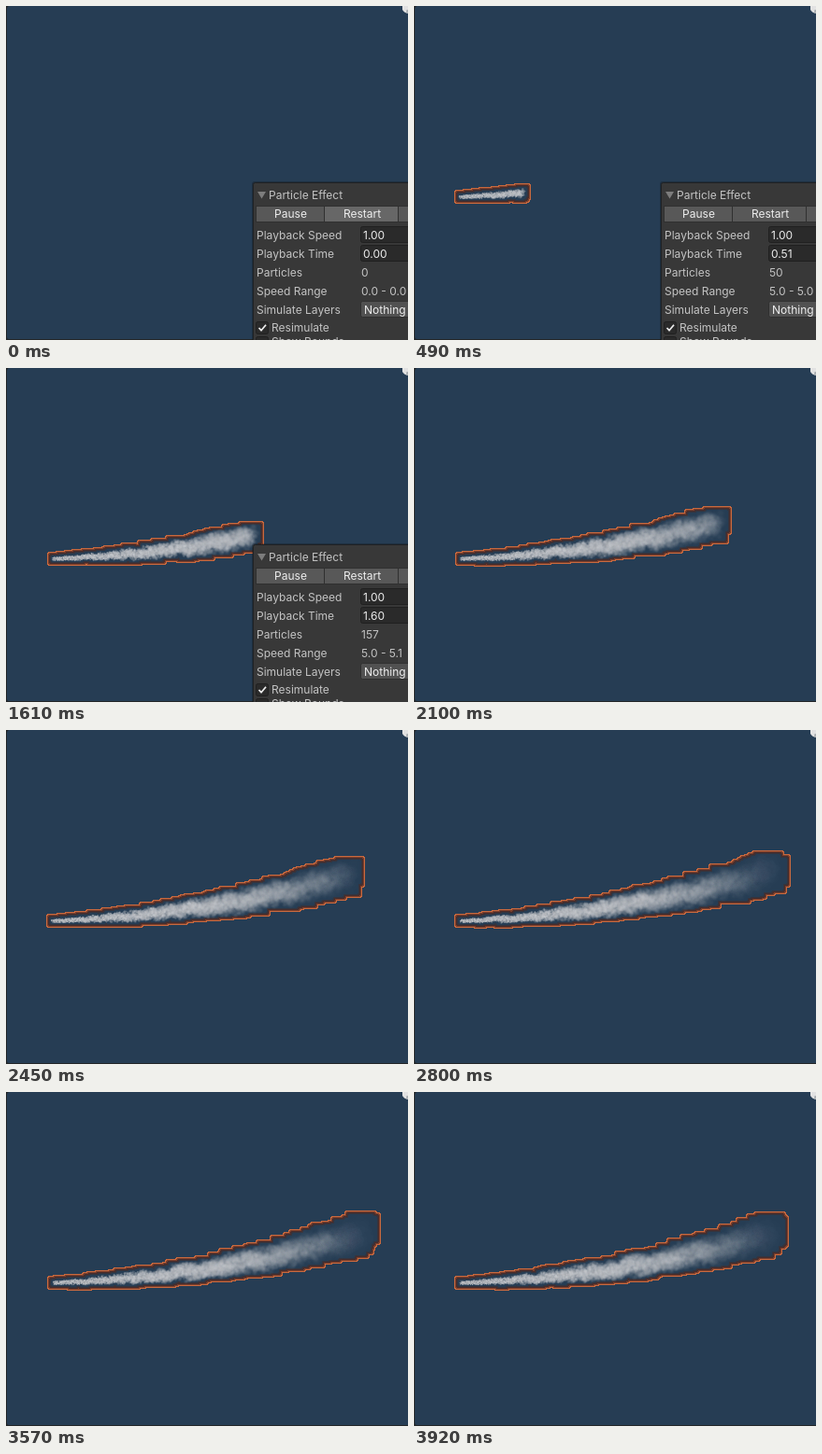
Animation, 430 px wide and 358 px high, one loop 3990 ms. Source, as an HTML page with a canvas:

```html
<!DOCTYPE html>
<html lang="en">
<head>
<meta charset="utf-8">
<title>Smoke trail</title>
<style>
  html, body { margin: 0; width: 100%; height: 100%; overflow: hidden; background: #263d54; }
  canvas, svg { position: absolute; left: 0; top: 0; width: 430px; height: 358px; display: block; }
  text { font: 12px Inter, sans-serif; fill: #c4c4c4; white-space: pre; }
  .bright { fill: #eee; }
  .mid { text-anchor: middle; }
  .field { fill: #2a2a2a; stroke: #202020; }
  .btn { fill: #585858; stroke: #303030; }
</style>
</head>
<body>
<canvas id="stage" width="430" height="358"></canvas>
<svg viewBox="0 0 430 358">
  <path d="M424 0H430V8Q426 7.500 424 4Z" fill="#e2e2e2"/>
  <path d="M428.500 4H430V8L428 7Z" fill="#a9adb0"/>
  <path d="M0 0H3Q1 1 1 3V355Q1 357 3 357H430V358H0Z" fill="#232628"/>
  <g id="panel">
    <rect x="263" y="188" width="170" height="173" rx="3" fill="#000" opacity=".25"/>
    <rect x="264.500" y="189.500" width="170" height="173" rx="2" fill="#383838" stroke="#202224"/>
    <path d="M269 199H278L273.500 206.500Z" fill="#7d7d7d"/>
    <text x="281" y="206.500">Particle Effect</text>
    <rect class="btn" x="267.500" y="214.500" width="73" height="17"/>
    <rect class="btn" id="restart" x="340.500" y="214.500" width="79" height="17"/>
    <rect class="btn" x="419.500" y="214.500" width="20" height="17"/>
    <text class="bright mid" x="304.500" y="227.300">Pause</text>
    <text class="bright mid" x="381" y="227.300">Restart</text>
    <rect class="field" x="379.500" y="236.500" width="60" height="17" rx="2"/>
    <rect class="field" x="379.500" y="256.500" width="60" height="17" rx="2"/>
    <rect x="379.500" y="316.500" width="60" height="17" rx="2" fill="#515151" stroke="#303030"/>
    <text x="268" y="249.500">Playback Speed</text>
    <text x="268" y="269.500">Playback Time</text>
    <text x="268" y="289.500">Particles</text>
    <text x="268" y="309.500">Speed Range</text>
    <text x="268" y="329.500">Simulate Layers</text>
    <text x="284" y="349">Resimulate</text>
    <text x="284" y="364">Show Bounds</text>
    <text class="bright" x="382" y="249.500">1.00</text>
    <text class="bright" x="382" y="269.500" id="time"></text>
    <text x="380" y="289.500" id="count"></text>
    <text x="380" y="309.500" id="range"></text>
    <text class="bright" x="383" y="329.500">Nothing</text>
    <rect class="field" x="267.500" y="338.500" width="13" height="13" rx="2"/>
    <path d="M270.500 345L273 347.700L278 341.700" fill="none" stroke="#eee" stroke-width="1.700"/>
    <rect class="field" x="267.500" y="354.500" width="13" height="13" rx="2"/>
  </g>
</svg>
<script>
const STEP = 70, STEPS = 57, PANEL_STEPS = 24;
const GAP = 0.0102, LIFE = 2.6;
const BG = '#263d54';
const byId = id => document.getElementById(id);
const ctx = byId('stage').getContext('2d');

function rand(i, salt) {
  const v = Math.sin(i * 127.1 + salt * 311.7 + 17.3) * 43758.5453;
  return v - Math.floor(v);
}

// Lumpy, soft-edged puff
function makePuff(seed) {
  const c = document.createElement('canvas');
  c.width = c.height = 64;
  const g = c.getContext('2d');
  for (let i = 0; i < 40; i++) {
    const k = seed * 50 + i;
    const angle = rand(k, 1) * Math.PI * 2, dist = Math.sqrt(rand(k, 2)) * 21;
    const x = 32 + Math.cos(angle) * dist, y = 32 + Math.sin(angle) * dist;
    const r = 4 + rand(k, 3) * 6;
    const tone = Math.round(155 + rand(k, 4) * 70);
    const rgb = `${tone},${tone + 2},${tone + 6}`;
    const grad = g.createRadialGradient(x, y, 0, x, y, r);
    grad.addColorStop(0, `rgba(${rgb},.65)`);
    grad.addColorStop(1, `rgba(${rgb},0)`);
    g.fillStyle = grad;
    g.fillRect(0, 0, 64, 64);
  }
  return c;
}
const puffs = Array.from({ length: 8 }, (_, i) => makePuff(i));

function particles(t) {
  const list = [];
  const first = Math.max(0, Math.ceil((t - LIFE) / GAP));
  for (let i = first; i * GAP < t; i++) {
    const a = t - i * GAP;
    const speed = 1 + (rand(i, 5) - 0.5) * 0.02;
    const spread = 4.5 * a - 0.6 * a * a;
    list.push({
      i, a,
      x: 50 + (135 * a - 2.5 * a * a) * speed,
      y: 204.6 - 4.5 * a - 6.1 * a * a + (rand(i, 6) * 2 - 1) * spread,
      h: 5.5 + 3.9 * a
    });
  }
  return list;
}

// Union of the particle boxes, corners clipped by one pixel
function fillBoxes(list, grow, color) {
  ctx.fillStyle = color;
  for (const p of list) {
    const x = Math.round(p.x - p.h) - grow, y = Math.round(p.y - p.h) - grow;
    const w = Math.round(p.x + p.h) + grow - x, h = Math.round(p.y + p.h) + grow - y;
    ctx.fillRect(x + 1, y, w - 2, h);
    ctx.fillRect(x, y + 1, w, h - 2);
  }
}

function drawSmoke(list) {
  for (const p of list) {
    const r = p.h * Math.min(1.15, 0.55 + 0.45 * p.a);
    ctx.save();
    ctx.globalAlpha = 0.8 * Math.pow(1 - p.a / LIFE, 1.5);
    ctx.translate(p.x, p.y);
    ctx.rotate(rand(p.i, 7) * 6.28 + p.a * (rand(p.i, 8) - 0.5));
    ctx.drawImage(puffs[p.i % puffs.length], -r, -r, r * 2, r * 2);
    ctx.restore();
  }
}

function drawPanel(n) {
  byId('panel').style.display = n < PANEL_STEPS ? '' : 'none';
  const play = n < 14 ? n * 1.01 / 14 : 1.01 + (n - 14) * 0.59 / 9;
  byId('time').textContent = play.toFixed(2);
  byId('count').textContent = Math.round(play * 98.1);
  byId('range').textContent = !n ? '0.0 - 0.0' : play < 1.3 ? '5.0 - 5.0' : '5.0 - 5.1';
  byId('restart').style.fill = n < 4 ? '#676767' : '#585858';
}

function draw(n) {
  const list = particles(n * STEP / 1000);
  ctx.fillStyle = BG;
  ctx.fillRect(0, 0, 430, 358);
  fillBoxes(list, 2, '#c8693f');
  fillBoxes(list, 1, '#7a3f2c');
  fillBoxes(list, 0, '#472d2d');
  fillBoxes(list, -1, '#34353f');
  fillBoxes(list, -2, BG);
  drawSmoke(list);
  drawPanel(n);
}

let last = -1;
const start = performance.now();
function tick() {
  const n = Math.floor((performance.now() - start) / STEP) % STEPS;
  if (n !== last) draw(last = n);
  requestAnimationFrame(tick);
}
tick();
</script>
</body>
</html>
```
